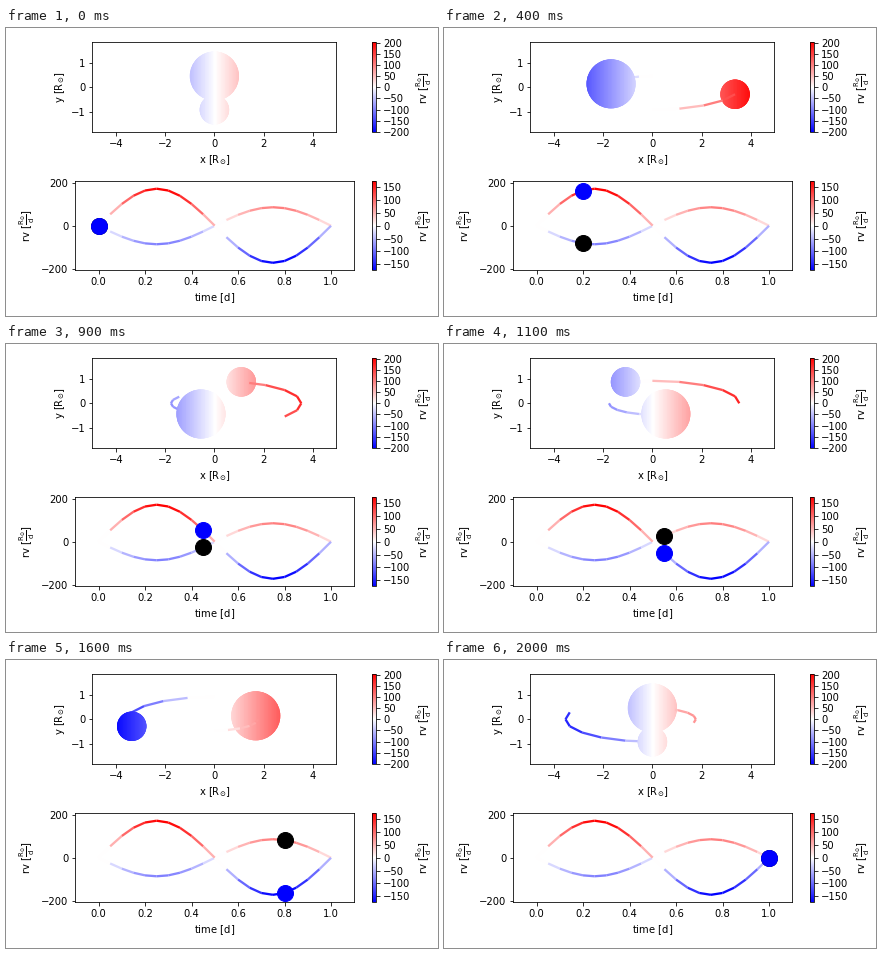
A matplotlib script that plays this animation: 432x288 px, repeating every 2.1 s.

```python
import numpy as np
import matplotlib.pyplot as plt
from matplotlib.animation import FuncAnimation
from matplotlib.cm import ScalarMappable
from matplotlib.colors import Normalize
from matplotlib.patches import Circle

W, H, DPI = 432, 288, 72
STEPS, TRAIL = 20, 6
INCL = np.radians(75)
KMS = 2 * np.pi * 8.052 * np.sin(INCL)  # line-of-sight speed per unit of x
STARS = [(-5.3 / 3, 1.0, "black"), (5.3 * 2 / 3, 0.6, "blue")]  # orbit, radius, marker
X_MAX = STARS[1][0] + STARS[1][1]
SKY_V = KMS * X_MAX
RV_V = KMS * STARS[1][0]
CAPS = 14
LW = 2.3

plt.rcParams.update({"font.family": "DejaVu Sans", "font.size": 10})
fig = plt.figure(figsize=(W / DPI, H / DPI), dpi=DPI, facecolor="white")


def add_axes(left, top, right, bottom):
    return fig.add_axes([left / W, 1 - bottom / H, (right - left) / W, (bottom - top) / H])


def orbit(a, t):
    """Sky position and depth towards the viewer."""
    phase = 2 * np.pi * t
    return (a * np.sin(phase),
            -a * np.cos(phase) * np.cos(INCL),
            a * np.cos(phase) * np.sin(INCL))


def shade(rv, limit):
    return plt.cm.bwr(0.5 + 0.5 * rv / limit)


def add_bar(cax, limit, top_tick):
    bar = fig.colorbar(ScalarMappable(Normalize(-limit, limit), "bwr"), cax=cax,
                       ticks=np.arange(-top_tick, top_tick + 1, 50))
    bar.set_label(RV_LABEL)


RV_LABEL = r"rv [$\mathrm{\frac{R_{\odot}}{d}}$]"
sky = add_axes(86.4, 14.3, 330.4, 104.3)
curve = add_axes(69.3, 153.3, 348.3, 242.2)
add_bar(add_axes(365.5, 14.3, 370.2, 104.3), SKY_V, 200)
add_bar(add_axes(365.5, 153.3, 370.2, 242.2), RV_V, 150)

times = np.arange(STEPS + 1) / STEPS
ramp = np.linspace(-X_MAX, X_MAX, 1024)[None, :]
trails, caps, dots = [], [], []

for n, (a, radius, color) in enumerate(STARS):
    x, y, z = orbit(a, times)
    rv = KMS * x
    for j in range(STEPS):
        pair = slice(j, j + 2)
        seg, = sky.plot(x[pair], y[pair], color=shade(rv[j], SKY_V), lw=LW,
                        solid_capstyle="butt", zorder=10 + z[j], visible=False)
        trails.append((j, seg))
        curve.plot(times[pair], rv[pair], color=shade(rv[j], RV_V), lw=LW,
                   solid_capstyle="butt")
    # Nested discs at rising depth let near trail pieces cut into the sphere.
    for h in np.linspace(0, 0.99 * radius, CAPS):
        disc = sky.imshow(ramp, cmap="bwr", vmin=-X_MAX, vmax=X_MAX, aspect="auto",
                          extent=(-X_MAX, X_MAX, -1.8, 1.8))
        caps.append((disc, a, np.sqrt(radius**2 - h**2), h))
    dot, = curve.plot([], [], "o", color=color, ms=16, mew=1, zorder=5 + n)
    dots.append((dot, a))

x_lim = 1.2 * X_MAX
y_lim = x_lim * 90 / 244
sky.set(xlim=(-x_lim, x_lim), ylim=(-y_lim, y_lim),
        xticks=[-4, -2, 0, 2, 4], yticks=[-1, 0, 1],
        xlabel=r"x [$\mathrm{R_{\odot}}$]", ylabel=r"y [$\mathrm{R_{\odot}}$]")
curve.set(xlim=(-0.1, 1.1), ylim=(-1.2 * RV_V, 1.2 * RV_V),
          xticks=np.arange(6) / 5, yticks=[-200, 0, 200],
          xlabel=r"time [$\mathrm{d}$]", ylabel=RV_LABEL)


def update(k):
    t = k / STEPS
    for j, seg in trails:
        seg.set_visible(k - TRAIL <= j < k)
    for disc, a, r, h in caps:
        x, y, z = orbit(a, t)
        disc.set_clip_path(Circle((x, y), r, transform=sky.transData))
        disc.set_zorder(10 + z + h)
    for dot, a in dots:
        dot.set_data([t], [KMS * orbit(a, t)[0]])
    return []


anim = FuncAnimation(fig, update, frames=STEPS + 1, interval=100, repeat=True)
plt.show()
```
